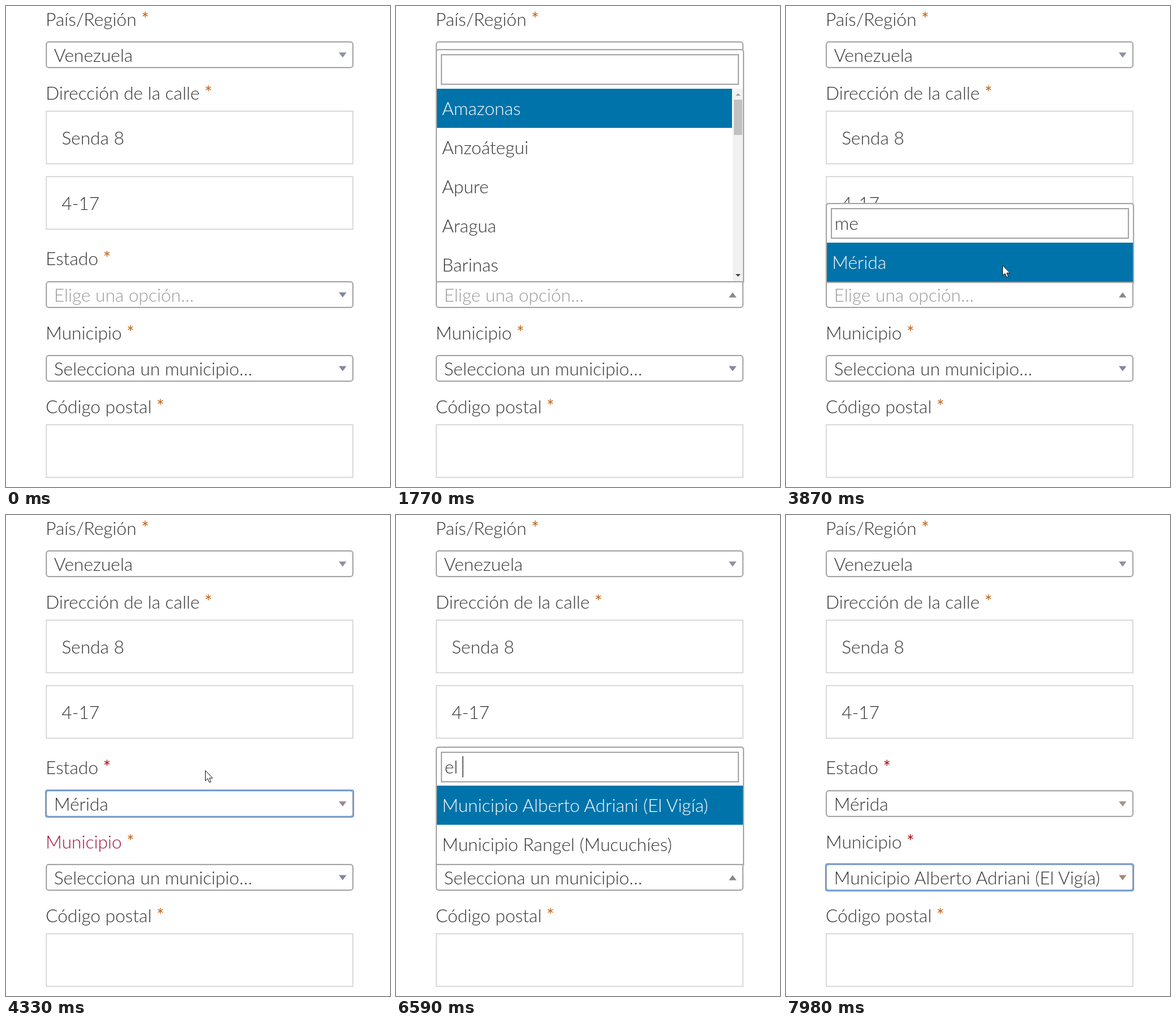
Animation of 600x750 px, one loop 8 s. Source, as an HTML page:

```html
<!DOCTYPE html>
<html lang="es">
<head>
<meta charset="utf-8">
<style>
html, body { margin: 0; width: 100%; height: 100%; overflow: hidden; background: #fff; }
svg { display: block; width: 600px; height: 750px; font: 300 28px Lato, sans-serif; }
text { white-space: pre; }
.req { font-weight: 400; }
</style>
</head>
<body>
<svg id="stage" viewBox="0 0 600 750"></svg>
<script>
const stage = document.getElementById('stage');
const LOOP = 8000, STEP = 77;
const INK = '#333', BLUE = '#0073aa', GREY = '#aaa', ORANGE = '#c0651c', RED = '#a81414';
const PICK = 'Selecciona un municipio…';
const ADRIANI = 'Municipio Alberto Adriani (El Vigía)';
const BELLO = 'Municipio Andrés Bello (La Azulita)';

const text = (x, y, s, fill = INK) => `<text x="${x}" y="${y}" fill="${fill}">${s}</text>`;
const fillBox = (x, y, w, h, fill) => `<rect x="${x}" y="${y}" width="${w}" height="${h}" fill="${fill}"/>`;
// Outer bounds of a box with a 2px border
const box = (x, y, w, h, stroke, r = 0, fill = '#fff') =>
  `<rect x="${x + 1}" y="${y + 1}" width="${w - 2}" height="${h - 2}" rx="${r}" fill="${fill}" stroke="${stroke}" stroke-width="2"/>`;
const triangle = (x, y, w, h, fill) => `<path d="M${x - w} ${y - h}h${2 * w}l${-w} ${2 * h}z" fill="${fill}"/>`;

const label = (y, s, star = ORANGE, fill = INK) =>
  text(62, y, `${s} <tspan class="req" fill="${star}">*</tspan>`, fill);

const input = (y, s = '') => box(62, y, 481, 84, '#ddd') + text(87, y + 53, s);

function select(y, s, { fill = INK, arrow = '#8b90a4', open, focus } = {}) {
  return box(62, y, 481, 42, GREY, 4)
    + (open ? fillBox(62, y, 6, 6, GREY) + fillBox(537, y, 6, 6, GREY) + fillBox(64, y + 2, 477, 5, '#fff') : '')
    + (focus ? box(61, y - 1, 483, 44, '#6a9fe6', 3, 'none') : '')
    + text(75, y + 32, s, fill)
    + triangle(526, y + 21.5, 6, open ? -4 : 4, open ? '#888' : arrow);
}

// rows: option texts ('\n' wraps); thumb: scrollbar thumb height, 0 for none
function dropdown({ top, list, bottom, query, caret, rows, thumb }) {
  let out = `<path d="M63 ${bottom + 1}V${top + 5}q0 -4 4 -4H539q4 0 4 4V${bottom + 1}z" fill="#fff" stroke="${GREY}" stroke-width="2"/>`
    + box(70, top + 8, 466, 48, GREY) + text(76, top + 42, query);
  if (caret) out += fillBox(caret, top + 15, 1, 33, '#000');
  let y = list, items = '';
  rows.forEach((row, i) => {
    const lines = row.split('\n');
    if (!i) items += fillBox(64, y, thumb ? 461 : 478, 61, BLUE);
    lines.forEach((s, k) => items += text(72, y + 41 + k * 43, s, i ? INK : '#fff'));
    y += 18 + 43 * lines.length;
  });
  const h = bottom - list;
  out += `<svg x="64" y="${list}" width="478" height="${h}" viewBox="64 ${list} 478 ${h}">${items}</svg>`;
  if (thumb) {
    out += fillBox(526, list, 16, h, '#f1f1f1') + fillBox(528, list + 17, 13, thumb, '#c1c1c1')
      + triangle(534.5, list + 9, 4, -2, '#a3a3a3') + triangle(534.5, bottom - 9, 4, 2, '#404040');
  }
  return out;
}

const pointer = ([x, y]) => `<path transform="translate(${x} ${y})" d="M.5 .5V16.5L4.2 13L6.8 19L9.3 18L6.8 12.2H11.8z" fill="#fff" stroke="#222"/>`;

// Pointer trips: start, arrival, hidden, from, to
const trips = [
  [1230, 1690, 1770, [575, 456], [320, 446]],
  [3560, 4110, 4490, [530, 445], [311, 398]],
  [4950, 5330, 5410, [579, 570], [330, 560]],
  [7120, 7440, 7980, [585, 463], [325, 448]]
];

function pointerAt(t) {
  const trip = trips.find(([start, , end]) => t >= start && t < end);
  if (!trip) return '';
  const [start, arrive, , from, to] = trip;
  const u = Math.min(1, Math.floor((t - start) / STEP) * STEP / (arrive - start - STEP));
  const ease = 1 - (1 - u) ** 2;
  return pointer(from.map((a, i) => Math.round(a + (to[i] - a) * ease)));
}

function stateList(t) {
  const full = { top: 67, list: 129, bottom: 429 };
  if (t < 2630) return dropdown({ ...full, query: '', thumb: 55,
    rows: ['Amazonas', 'Anzoátegui', 'Apure', 'Aragua', 'Barinas'] });
  if (t < 2860) return dropdown({ ...full, query: 'm', caret: 100, thumb: 262,
    rows: ['Amazonas', 'Delta Amacuro', 'Mérida', 'Miranda', 'Monagas'] });
  return dropdown({ top: 307, list: 369, bottom: 430, query: 'me', caret: t < 3400 && 113, rows: ['Mérida'] });
}

function townList(t) {
  const full = { top: 182, list: 244, bottom: 544 };
  if (t < 6430) return dropdown({ ...full, query: t < 6190 ? '' : 'e', caret: t >= 6190 && 91, thumb: t < 6190 ? 45 : 54,
    rows: [PICK, ADRIANI, BELLO, 'Municipio Antonio Pinto Salinas\n(Santa Cruz de Mora)'] });
  if (t < 6590) return dropdown({ ...full, query: 'el', caret: 97, thumb: 196,
    rows: [PICK, ADRIANI, BELLO, 'Municipio Campo Elías (Ejido)', 'Municipio Obispo Ramos de Lora\n(Santa Elena de Arenales)'] });
  return dropdown({ top: 361, list: 422, bottom: 544, query: 'el ', caret: t < 7120 && 104,
    rows: [ADRIANI, 'Municipio Rangel (Mucuchíes)'] });
}

function scene(t) {
  const stateOpen = t >= 1690 && t < 4260, townOpen = t >= 5330 && t < 7750;
  const stateSet = t >= 4260, townSet = t >= 7750;
  return label(31, 'País/Región') + select(55, 'Venezuela')
    + label(146, 'Dirección de la calle') + input(163, 'Senda 8') + input(265, '4-17')
    + label(404, 'Estado', stateSet ? RED : ORANGE)
    + select(429, stateSet ? 'Mérida' : 'Elige una opción…', {
        fill: stateSet ? INK : '#999', open: stateOpen, focus: stateSet && t < 5330,
        arrow: townSet ? '#a59486' : stateSet ? '#9c8698' : '#8088a0' })
    + label(520, 'Municipio', townSet ? RED : ORANGE, stateSet && !townSet ? '#a0143c' : INK)
    + select(544, townSet ? ADRIANI : PICK, { open: townOpen, focus: townSet, arrow: townSet ? '#a08878' : '#8088a0' })
    + label(635, 'Código postal') + input(652)
    + (stateOpen ? stateList(t) : '') + (townOpen ? townList(t) : '')
    + pointerAt(t);
}

let shown = '';
function frame() {
  const next = scene(performance.now() % LOOP);
  if (next !== shown) stage.innerHTML = shown = next;
  requestAnimationFrame(frame);
}
frame();
</script>
</body>
</html>
```
